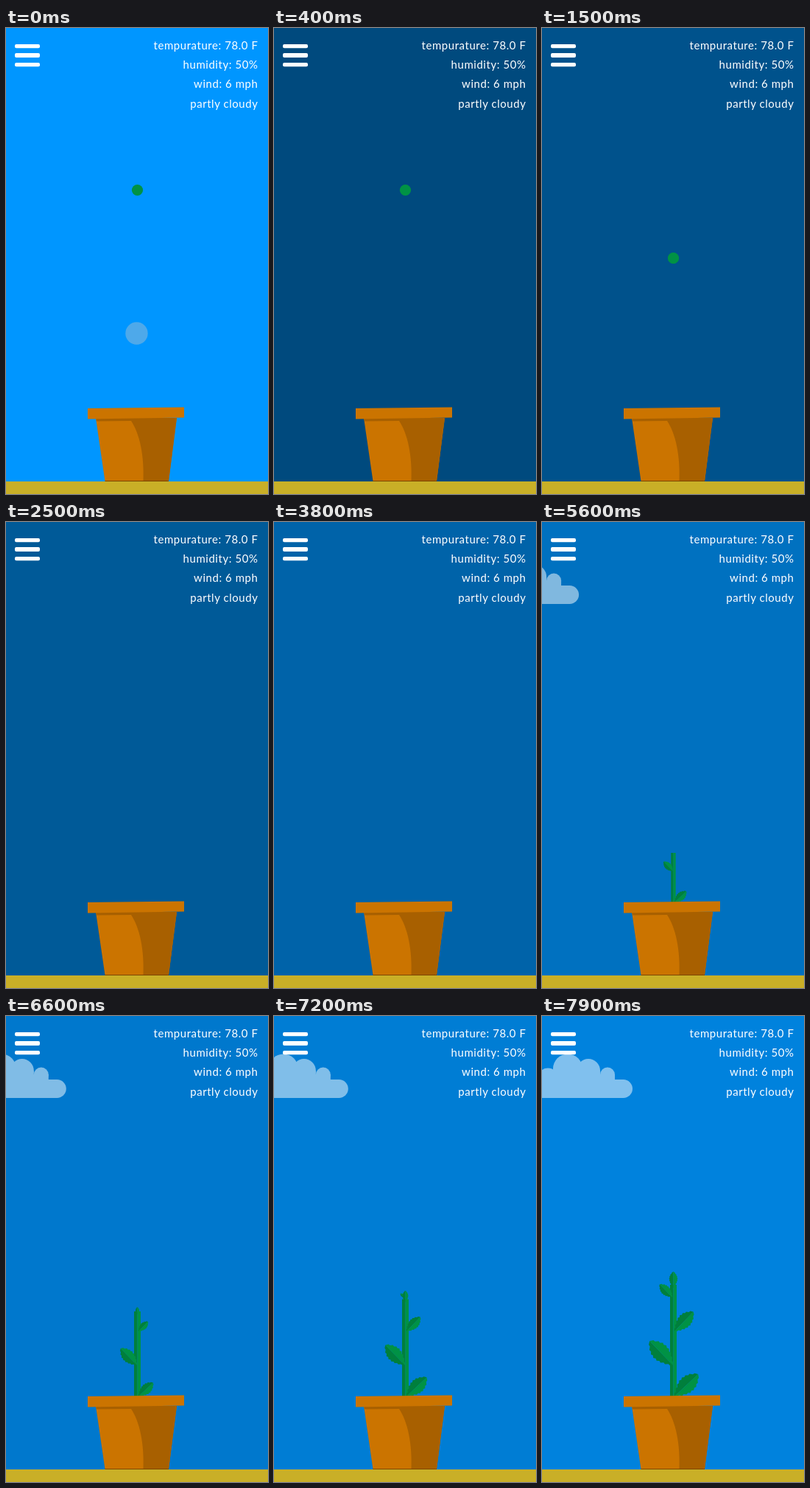
These frames come from a looping animation (356x631 px, 8 s). An HTML page:

```html
<!DOCTYPE html>
<html lang="en">
<head>
<meta charset="utf-8">
<title>Plant weather</title>
<style>
  html, body { margin: 0; width: 100%; height: 100%; overflow: hidden; }
  svg { display: block; width: 100vw; height: 100vh; }
  text { font: 15px Lato, sans-serif; letter-spacing: .55px; fill: #fff; text-anchor: end; }
</style>
</head>
<body>
<svg viewBox="0 0 356 631">
  <defs>
    <g id="leaf"><path id="darkHalf" fill="#007f3c"/><path id="lightHalf" fill="#009245"/></g>
  </defs>
  <rect id="sky" width="356" height="631"/>

  <g id="cloud" fill="#fff" opacity=".5">
    <circle cx="-12" cy="98.5" r="12.5"/>
    <circle cx="8" cy="85" r="14.5"/>
    <circle cx="35" cy="71.5" r="20"/>
    <circle cx="63" cy="74" r="16"/>
    <circle cx="89" cy="79.5" r="10"/>
    <circle cx="110.5" cy="98.5" r="12.5"/>
    <path d="M-12 111V86H8V74H79V79H99V86H110.5V111Z"/>
  </g>

  <g fill="#fff">
    <rect x="12" y="22" width="34" height="5.3" rx="2"/>
    <rect x="12" y="34" width="34" height="6" rx="2"/>
    <rect x="12" y="47" width="34" height="5.3" rx="2"/>
  </g>
  <text x="342.5" y="28.5">tempurature: 78.0 F</text>
  <text x="342.5" y="55">humidity: 50%</text>
  <text x="342.5" y="81">wind: 6 mph</text>
  <text x="342.5" y="107.5">partly cloudy</text>

  <circle id="touch" cx="177.5" cy="413.5" r="15.2" fill="#c8c8c8"/>
  <circle id="seed" cx="178.5" r="7.6" fill="#009245"/>

  <g id="plant">
    <path id="stemDark" fill="#007f3c"/>
    <path id="stemLight" fill="#009245"/>
  </g>

  <path d="M122 528H232L221 613.5H134.5Z" fill="#cb7400"/>
  <path d="M122 528H232L221 613.5H186.500C188 580 182 550 170 532L123 532.500Z" fill="#a86000"/>
  <path d="M111 515L242 513.500V527.500L111 529.500Z" fill="#cb7400"/>
  <path d="M134.500 613.500H221" stroke="#7d4700"/>
  <rect y="614" width="356" height="17" fill="#c9af27"/>
</svg>
<script>
const $ = id => document.getElementById(id);
const LOOP = 8000, STEP = 100, HELD = [1700, 4600, 6000, 7500];

// Linear interpolation through [time, value] points
function track(t, points) {
  if (t <= points[0][0]) return points[0][1];
  for (let i = 1; i < points.length; i++) {
    const [a, from] = points[i - 1], [b, to] = points[i];
    if (t < b) return from + (to - from) * (t - a) / (b - a);
  }
  return points[points.length - 1][1];
}

// Serrated half of a leaf of length 44, on one side of its midrib
function halfLeaf(side) {
  let d = 'M0 0';
  for (let i = 1; i < 16; i++) {
    const u = i / 16;
    const width = 11 * Math.sin(Math.PI * u ** 1.15) ** .8 + (i % 2 ? .9 : -.9);
    d += `L${(44 * u).toFixed(2)} ${(side * Math.max(.5, width)).toFixed(2)}`;
  }
  return d + 'L44 0Z';
}
$('darkHalf').setAttribute('d', halfLeaf(-1));
$('lightHalf').setAttribute('d', halfLeaf(1));

const leaves = [
  { x: 180, y: 515, angle: -43, size: 1, grow: [[4200, 0], [4500, .22], [5500, .5], [5900, .51], [6600, .62], [6900, .74], [7400, .93], [7900, 1]] },
  { x: 178, y: 473, angle: -134, size: 1.04, grow: [[4900, 0], [5600, .4], [6600, .7], [7900, 1]] },
  { x: 180, y: 427, angle: -46, size: .84, grow: [[6000, 0], [6600, .5], [7900, 1]] },
  { x: 177, y: 381, angle: -134, size: .56, grow: [[6900, 0], [7900, 1]] },
  { x: 178.5, angle: -90, size: .5, grow: [[6000, 0], [6600, .45], [7900, 1]] }
];
for (const leaf of leaves) {
  leaf.node = document.createElementNS('http://www.w3.org/2000/svg', 'use');
  leaf.node.setAttribute('href', '#leaf');
  $('plant').append(leaf.node);
}

function seedY(t) {
  const n = Math.max(0, (t - 600) / 100), m = n - 10;
  return 219.5 + (m <= 0 ? 7.72 * n + .28 * n * n : 105 + 14.1 * m + m * m);
}

function draw(t) {
  const green = t < 300 ? 150 : t < 400 ? 112 : 74 + (t - 400) * .00747;
  $('sky').setAttribute('fill', `rgb(0,${Math.round(green)},${Math.round(green * 1.7)})`);
  $('touch').setAttribute('opacity', t < 300 ? .39 : t < 400 ? .2 : 0);
  $('seed').setAttribute('cy', t < 700 ? 219.5 : seedY(t));
  $('seed').setAttribute('opacity', t < 2500 ? 1 : 0);
  $('cloud').setAttribute('transform', `translate(${(t - 7900) * .0317} 0)`);

  $('plant').setAttribute('visibility', t < 4000 ? 'hidden' : 'visible');
  const top = track(t, [[4000, 514], [5600, 448], [6600, 400], [7900, 364]]);
  const half = track(t, [[4000, 2.5], [5600, 3.2], [6600, 4.5]]);
  $('stemDark').setAttribute('d', `M${178.5 - half} 516V${top}H178.5V516Z`);
  $('stemLight').setAttribute('d', `M178.5 516V${top}H${178.5 + half}V516Z`);
  for (const { node, x, y = top + 4, angle, size, grow } of leaves) {
    node.setAttribute('transform', `translate(${x} ${y}) rotate(${angle}) scale(${size * track(t, grow)})`);
  }
}

function tick(now) {
  let t = Math.floor(now % LOOP / STEP) * STEP;
  if (HELD.includes(t)) t -= STEP;
  draw(t);
  requestAnimationFrame(tick);
}
tick(performance.now());
</script>
</body>
</html>
```
